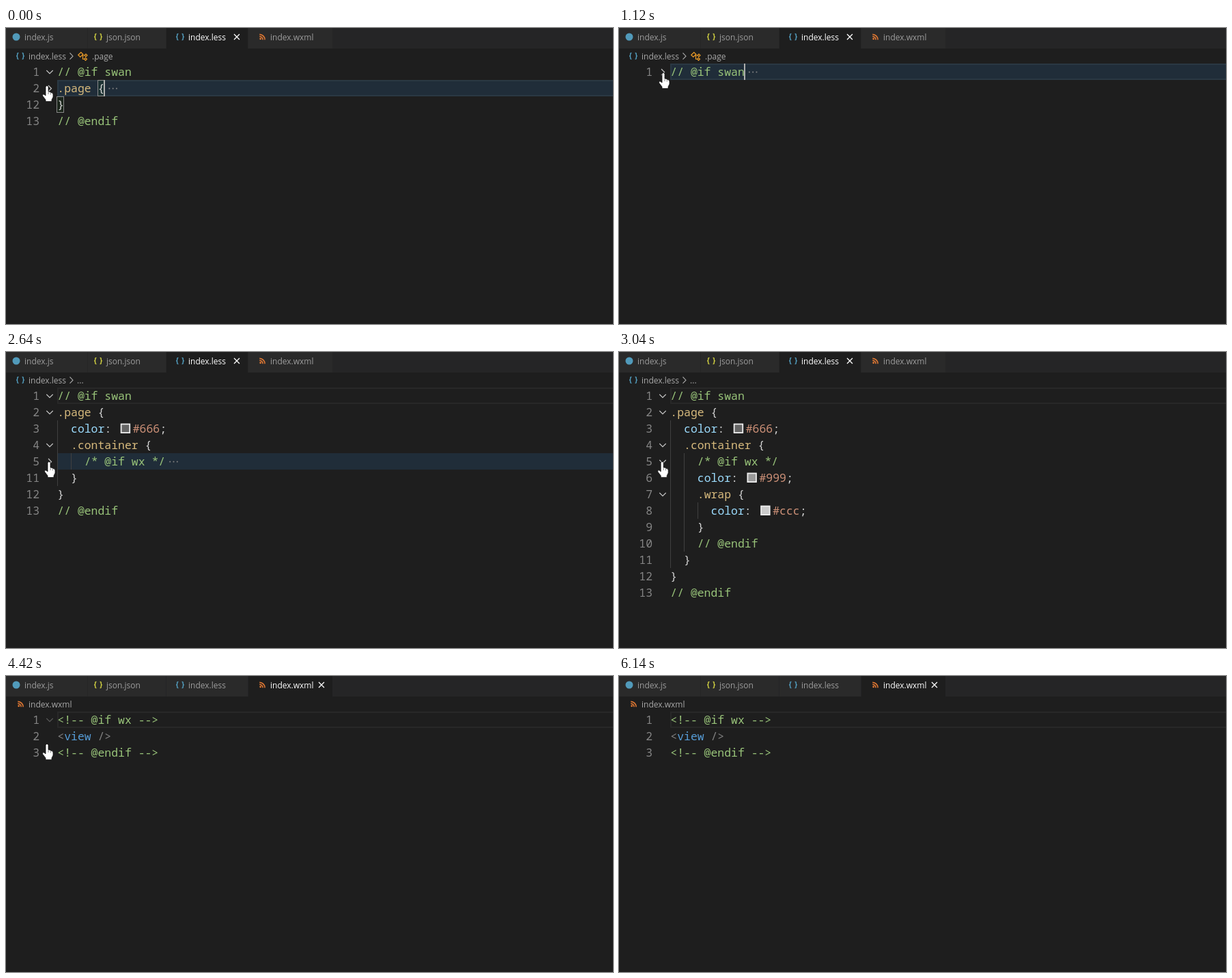
Animation of 889 by 433 pixels, one loop 6.53 s. Source, as an HTML page:

```html
<!DOCTYPE html>
<html lang="en">
<head>
<meta charset="utf-8">
<title>Folding conditional blocks</title>
<style>
html, body { margin: 0; width: 100%; height: 100%; overflow: hidden; background: #1e1e1e; }
svg { display: block; width: 889px; height: 433px; }
text { white-space: pre; }
.ui { font: 12px "Open Sans", "Noto Sans", sans-serif; }
.code { font: 16.45px "Noto Sans Mono", "DejaVu Sans Mono", monospace; }
.line { fill: none; }
</style>
</head>
<body>
<svg viewBox="0 0 889 433">
  <rect width="889" height="433" fill="#1e1e1e"/>
  <g id="bar"></g>
  <g id="editor"></g>
  <g id="folds" class="line" stroke="#c5c5c5" stroke-width="1.2"></g>
  <rect id="caret" width="2" height="24" fill="#aeafad"/>
  <circle id="click" r="12" fill="#ffec00" opacity=".5"/>
  <g id="hand">
    <path d="M-2 1.5Q-2 -.5 0 -.5T2 1.5V8L4 8.2Q5.2 8.5 5.4 9.2Q8.8 9.5 9 12V16L7 20V22.5H-2V20L-6.2 14.5Q-7 12.5 -5.6 12Q-4 11.7 -2 14Z" fill="#fff" stroke="#111" stroke-width=".8"/>
    <path d="M2 8.5V12M5.3 9.5V12.5" class="line" stroke="#555" stroke-width=".7"/>
  </g>
</svg>
<script>
const LOOP = 6530, TICK = LOOP / 99;
const X0 = 75.3, CW = 9.87, ROW = 24, TOP = 52;
const GREEN = '#98c379', GOLD = '#d7ba7d', PROP = '#9cdcfe', VALUE = '#ce9178',
      PLAIN = '#d4d4d4', GREY = '#808080', BLUE = '#569cd6', DIM = '#9d9d9d';

const docs = {
  less: {
    lines: ['// @if swan', '.page {', '  color: #666;', '  .container {', '    /* @if wx */',
      '    color: #999;', '    .wrap {', '      color: #ccc;', '    }', '    // @endif',
      '  }', '}', '// @endif'],
    heads: [1, 2, 4, 5, 7],
    guides: [[0, 3, 11], [2, 5, 10], [4, 8, 8]]
  },
  wxml: {
    lines: ['<!-- @if wx -->', '<view />', '<!-- @endif -->'],
    heads: [1],
    guides: []
  }
};

// start, document, current line, folded range, breadcrumb tail
const scenes = [
  [0, 'less', 2, [2, 11], '.page'],
  [460, 'less', 2, null, '.page'],
  [1120, 'less', 1, [1, 13], '.page'],
  [1190, 'less', 1, [1, 13], '...'],
  [1580, 'less', 1, null, '...'],
  [2510, 'less', 1, [5, 10], '...'],
  [3035, 'less', 1, null, '...'],
  [3890, 'wxml', 1, null, ''],
  [4750, 'wxml', 1, [1, 3], ''],
  [5280, 'wxml', 1, null, '']
];
const clicks = [[400, 460], [1060, 1120], [1520, 1580], [2380, 2510], [2970, 3035],
  [3760, 3890], [4690, 4750], [5210, 5280]];
const caretOn = [[0, 930], [1120, 1580], [2050, 2570], [3230, 4360], [4750, 5280], [5680, 6130]];
const handPath = [[0, 60, 85], [530, 60, 85], [990, 65, 66], [1660, 65, 66], [2115, 60, 139],
  [2310, 63, 161], [3035, 63, 161], [3500, 401, 9], [3960, 401, 9], [4420, 60, 100],
  [4620, 67, 63], [5420, 67, 63], [5740, 66, 189], [5810, 90, 189], [LOOP, 90, 189]];
const foldFade = [[0, 1], [3170, 1], [3480, 0], [4300, 0], [4620, 1], [5460, 1], [5860, 0], [LOOP, 0]];

const $ = id => document.getElementById(id);
const within = (spans, t) => spans.some(([a, b]) => t >= a && t < b);
const esc = s => s.replace(/&/g, '&amp;').replace(/</g, '&lt;');
const text = (x, y, s, fill, cls, anchor = 'start') =>
  `<text x="${x}" y="${y}" fill="${fill}" class="${cls}" text-anchor="${anchor}">${esc(s)}</text>`;
const rect = (x, y, w, h, attrs) => `<rect x="${x}" y="${y}" width="${w}" height="${h}" ${attrs}/>`;
const stroke = (d, color, w) => `<path class="line" d="${d}" stroke="${color}" stroke-width="${w}"/>`;

function track(keys, t) {
  const i = Math.max(1, keys.findIndex(k => k[0] > t));
  const a = keys[i - 1], b = keys[i];
  const u = (t - a[0]) / (b[0] - a[0]), e = u * u * (3 - 2 * u);
  return a.slice(1).map((v, j) => v + (b[j + 1] - v) * e);
}

function braces(x, y, color) {
  const half = 'M-2.6 -4.6Q-4.3 -4.6 -4.3 -3V-1.6Q-4.3 0 -5.8 0Q-4.3 0 -4.3 1.6V3Q-4.3 4.6 -2.6 4.6';
  return `<g transform="translate(${x} ${y})">${stroke(half, color, 1.5)}` +
    `<g transform="scale(-1 1)">${stroke(half, color, 1.5)}</g></g>`;
}

function feed(x, y) {
  const c = '#e37933';
  return `<g transform="translate(${x} ${y})"><circle cx="-2.8" cy="2.8" r="1.4" fill="${c}"/>` +
    stroke('M-4.2 -.6A4.6 4.6 0 0 1 .6 4.2M-4.2 -3.6A7.8 7.8 0 0 1 3.6 4.2', c, 1.6) + '</g>';
}

const cross = (x, color) => stroke(`M${x - 4} 9l8 8m0 -8l-8 8`, color, 1.3);

function drawBar(doc, crumb, hover) {
  const less = doc === 'less';
  const tab = (x, w, on) => rect(x, 0, w, 30, `fill="${on ? '#1e1e1e' : '#2a2a2a'}"`);
  const name = (x, s, on) => text(x, 18, s, on ? '#fff' : DIM, 'ui');
  let s = rect(0, 0, 889, 30, 'fill="#252526"') +
    tab(0, 119) + tab(120, 114) + tab(235, 119, less) + tab(355, 123, !less) +
    '<circle cx="15" cy="13" r="5.5" fill="#519aba"/>' +
    braces(135, 13, '#cbcb41') + braces(255, 13, '#519aba') + feed(375.5, 13) +
    name(27, 'index.js') + name(147, 'json.json') +
    name(267, 'index.less', less) + name(387, 'index.wxml', !less);
  if (less) s += cross(338, '#fff');
  if (!less || hover) s += cross(462, less ? DIM : '#fff');

  s += (less ? braces(21, 41, '#519aba') : feed(21.5, 41)) +
    text(33, 46, 'index.' + doc, '#a9a9a9', 'ui');
  if (crumb) s += stroke('M93.5 36.5l4.5 4.7l-4.5 4.7', '#a9a9a9', 1.1);
  if (crumb === '.page') {
    s += stroke('M105.8 39.5l4 -4l3 3l-4 4zM112 40H115M112.5 40V45.5H114.5' +
      'M115 40l2 -2l2 2l-2 2zM114.5 45.5l2 -2l2 2l-2 2z', '#ee9d28', 1.2) +
      text(126, 46, crumb, '#a9a9a9', 'ui');
  } else if (crumb) s += text(104, 46, crumb, '#a9a9a9', 'ui');
  return s;
}

// Splits a line into [text, colour] parts.
function tokens(src) {
  if (/^(\/\/|\/\*|<!)/.test(src)) return [[src, GREEN]];
  if (src[0] === '<') return [['<', GREY], ['view', BLUE], [' />', GREY]];
  if (src[0] === '.') return [[src.slice(0, -2), GOLD], [' {', PLAIN]];
  if (src[0] === 'c') return [['color', PROP], [': ', PLAIN], [src.slice(7, 11), VALUE], [';', PLAIN]];
  return [[src, PLAIN]];
}

function drawLine(src, y) {
  const code = src.trimStart();
  let x = X0 + (src.length - code.length) * CW, s = '';
  for (const [part, color] of tokens(code)) {
    if (color === VALUE) {
      s += rect(x + 4.5, y + 5.5, 12.6, 12.6, `fill="${part}" stroke="#eee" stroke-width="1.8"`);
      x += 21.6;
    }
    s += text(x, y + 18, part, color, 'code');
    x += part.length * CW;
  }
  return s;
}

function drawEditor(doc, cur, fold) {
  const { lines, heads, guides } = docs[doc];
  let s = '', marks = '', row = 0, caret;
  lines.forEach((src, i) => {
    const n = i + 1;
    if (fold && n > fold[0] && n <= fold[1]) return;
    const y = TOP + ROW * row++, end = X0 + src.length * CW;
    const folded = fold && n === fold[0];
    if (folded) s += rect(75, y, 814, ROW, 'fill="#202d39"');
    if (n === cur) {
      s += rect(76, y + 1, 830, 22, `class="line" stroke="${folded ? '#2a3843' : '#282828'}" stroke-width="2"`);
      caret = [Math.round(end - 1), y];
    }
    for (const [col, a, b] of guides)
      if (n >= a && n <= b) s += rect(Math.round(X0 + col * CW), y, 1, ROW, 'fill="#404040"');
    if (cur === 2 && (n === 2 || n === 12))
      s += rect(Math.round(end - CW) - .5, y + .5, 10, 23, 'fill="#006400" fill-opacity=".1" stroke="#888"');
    s += text(49, y + 18, String(n), '#858585', 'code', 'end') + drawLine(src, y);
    if (folded)
      for (const dx of [7, 12.3, 17.6])
        s += `<circle cx="${end + dx}" cy="${y + 12.5}" r="1" fill="#858585"/>`;
    if (heads.includes(n))
      marks += `<path d="${folded ? `M62 ${y + 8}l4.5 4.5l-4.5 4.5` : `M59.3 ${y + 10}l4.7 4.7l4.7 -4.7`}"/>`;
  });
  $('editor').innerHTML = s;
  $('folds').innerHTML = marks;
  $('caret').setAttribute('x', caret[0]);
  $('caret').setAttribute('y', caret[1]);
}

const show = (id, on) => $(id).setAttribute('visibility', on ? 'visible' : 'hidden');
let shown = '';

function render(ms) {
  const t = Math.floor((ms % LOOP + 2) / TICK) * TICK % LOOP + 8;
  const scene = scenes.filter(s => s[0] <= t).pop();
  const [start, doc, cur, fold, crumb] = scene;
  const hover = t >= 3500 && t < 3960;
  const key = start + ' ' + hover;
  if (key !== shown) {
    shown = key;
    $('bar').innerHTML = drawBar(doc, crumb, hover);
    drawEditor(doc, cur, fold);
  }
  const [x, y] = track(handPath, t);
  $('hand').setAttribute('transform', `translate(${x.toFixed(1)} ${y.toFixed(1)})`);
  show('hand', x < 76 || y < TOP);
  $('click').setAttribute('cx', x - 1);
  $('click').setAttribute('cy', y - 1);
  show('click', within(clicks, t));
  show('caret', within(caretOn, t));
  $('folds').setAttribute('opacity', track(foldFade, t)[0]);
}

const begin = performance.now();
function loop() {
  render(performance.now() - begin);
  requestAnimationFrame(loop);
}
loop();
</script>
</body>
</html>
```
